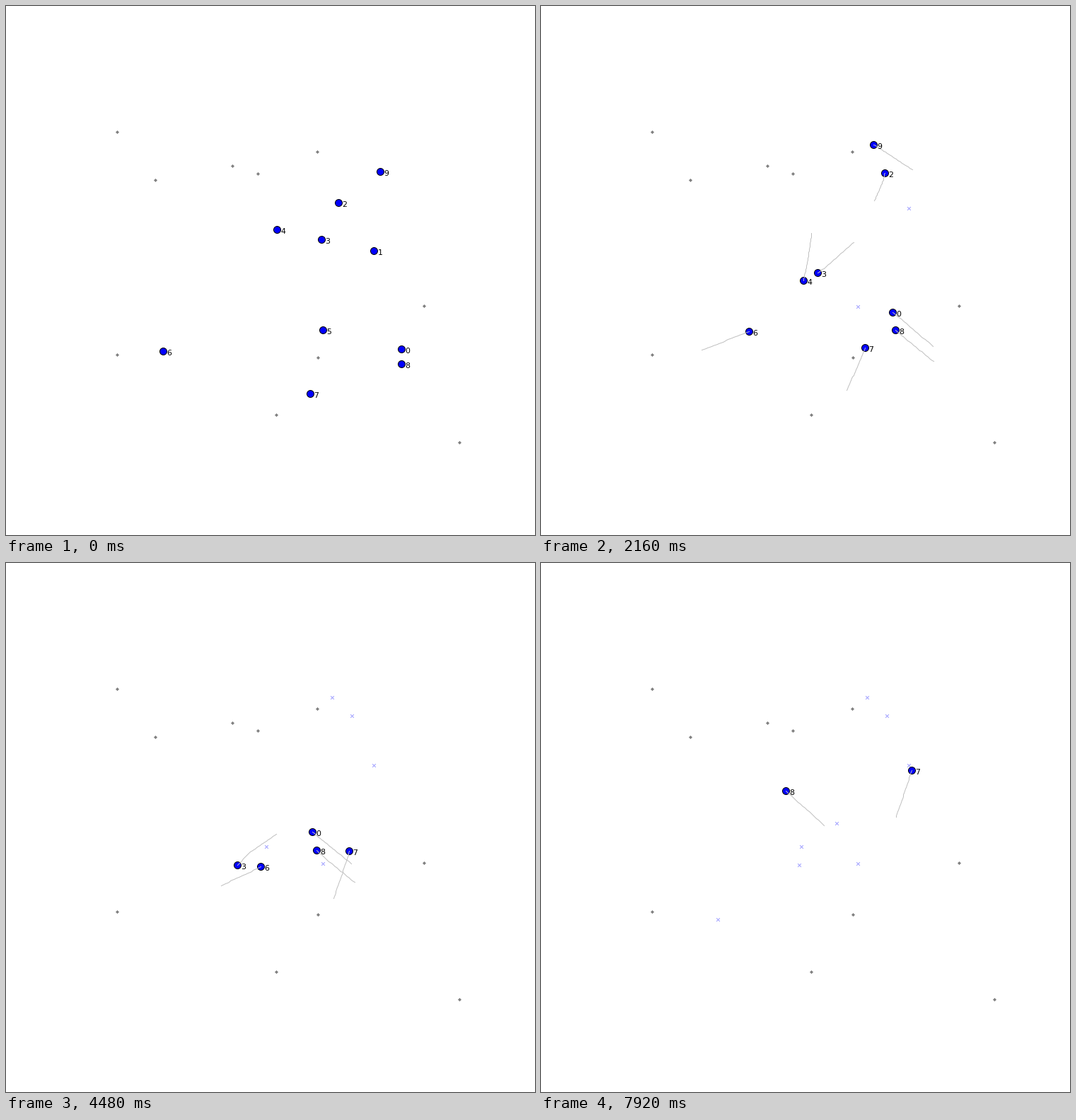
These frames come from a looping animation (748 px wide and 748 px high, 8000 ms). A matplotlib script:

```python
import numpy as np
import matplotlib.pyplot as plt
from matplotlib.animation import FuncAnimation
from matplotlib.patches import Circle, RegularPolygon

SIZE, DPI = 748, 64
FRAMES, INTERVAL = 100, 80
TAIL = 25
PX = 72 / DPI  # one pixel in points

plt.rcParams["path.simplify"] = False
fig = plt.figure(figsize=(SIZE / DPI, SIZE / DPI), dpi=DPI, facecolor="white")
ax = fig.add_axes([0, 0, 1, 1])
ax.set_xlim(-0.5, SIZE - 0.5)
ax.set_ylim(SIZE - 0.5, -0.5)
ax.axis("off")


def stroke(color, z):
    line, = ax.plot([], [], color=color, lw=PX, snap=False, zorder=z)
    return line


class Track:
    """A numbered dot with a short trail; a cross marks where it ends."""

    def __init__(self, label, life, *points):
        self.life = life
        times = np.linspace(0, life, len(points))
        steps = np.arange(life + 1)
        self.path = np.round(np.column_stack(
            [np.interp(steps, times, values) for values in zip(*points)]))
        z = 10 + 3 * label
        self.dot = ax.add_patch(Circle((0, 0), 5, fc="#0000ff", ec="black",
                                       lw=PX, snap=False, zorder=z))
        self.tail = stroke("#c0c0c0", z + 1)
        self.text = ax.text(0, 0, str(label), family="DejaVu Sans",
                            size=11 * PX, va="baseline", zorder=z + 2)
        self.cross = stroke("#a0a0ff", 5)
        x, y = self.path[-1]
        self.cross.set_data([x - 2, x + 2, np.nan, x - 2, x + 2],
                            [y - 2, y + 2, np.nan, y + 2, y - 2])

    def show(self, n):
        alive = n < self.life
        for artist in (self.dot, self.tail, self.text):
            artist.set_visible(alive)
        self.cross.set_visible(not alive)
        if alive:
            x, y = self.path[n]
            self.dot.center = x, y
            self.text.set_position((x + 4.8, y + 5.5))
            self.tail.set_data(*self.path[max(0, n - TAIL):n + 1].T)
            self.tail.set_visible(n > 0)


for spot in [(157, 178), (211, 246), (320, 226), (356, 237), (440, 206),
             (591, 424), (157, 493), (441, 497), (382, 578), (641, 617)]:
    ax.add_patch(RegularPolygon(spot, 4, radius=2.5, fc="#808080", ec="none",
                                snap=False, zorder=2))

# Each track runs at an even pace through its points over its life in frames
tracks = [
    Track(0, 63, (559, 485), (487, 424), (418, 368)),
    Track(1, 23, (520, 346), (520, 286)),
    Track(2, 41, (470, 278), (484, 245), (489, 216)),
    Track(3, 95, (446, 330), (398, 372), (344, 409), (297, 459), (250, 504)),
    Track(4, 32, (383, 316), (377, 359), (368, 401)),
    Track(5, 12, (448, 458), (448, 425)),
    Track(6, 58, (222, 488), (299, 458), (365, 427)),
    Track(7, 100, (430, 548), (465, 468), (495, 379), (525, 290)),
    Track(8, 100, (559, 506), (452, 418), (344, 320)),
    Track(9, 31, (529, 234), (497, 213), (461, 190)),
]


def update(n):
    for track in tracks:
        track.show(n)
    return []


anim = FuncAnimation(fig, update, frames=FRAMES, interval=INTERVAL,
                     repeat=True, repeat_delay=0, blit=False)
plt.show()
```
